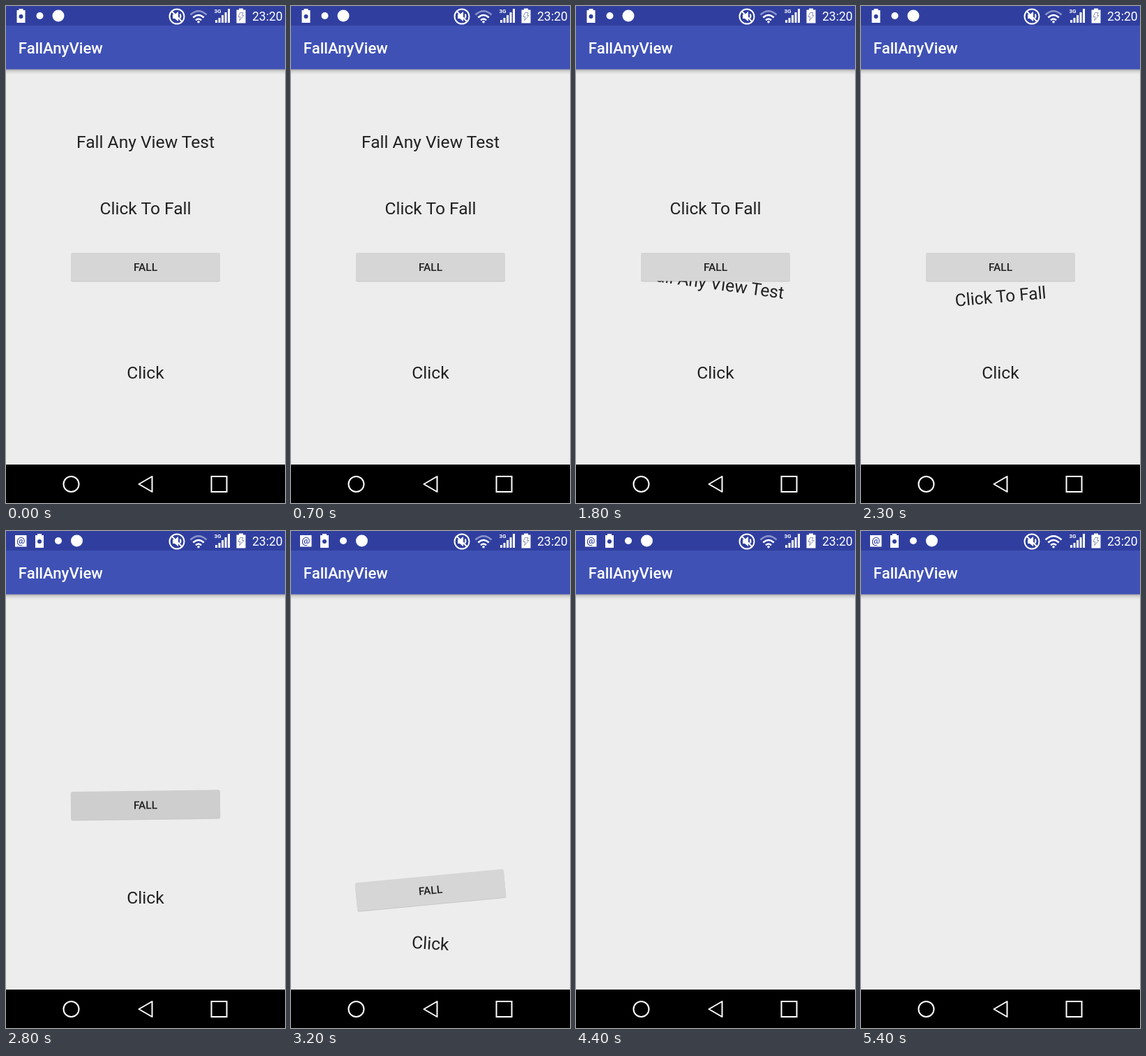
These frames come from a looping animation (400 by 711 pixels, 5500 ms). An HTML page:

```html
<!DOCTYPE html>
<html lang="en">
<head>
<meta charset="utf-8">
<title>FallAnyView</title>
<style>
html, body { margin: 0; width: 100%; height: 100%; overflow: hidden; background: #ededed; }
svg { display: block; width: 400px; height: 711px; }
text { font-family: Roboto, sans-serif; }
.view { font-size: 24.6px; fill: #212121; text-anchor: middle; }
.medium { font-weight: 500; }
.line { fill: none; stroke: #fff; stroke-width: 2; }
</style>
</head>
<body>
<svg viewBox="0 0 400 711">
  <defs>
    <linearGradient id="shade" x1="0" y1="0" x2="0" y2="1">
      <stop offset="0" stop-color="#000" stop-opacity=".32"/>
      <stop offset=".45" stop-color="#000" stop-opacity=".1"/>
      <stop offset="1" stop-color="#000" stop-opacity="0"/>
    </linearGradient>
    <clipPath id="content"><rect y="90" width="400" height="566"/></clipPath>
  </defs>

  <rect width="400" height="711" fill="#ededed"/>
  <g clip-path="url(#content)">
    <g id="title"><text class="view" x="200" y="203">Fall Any View Test</text></g>
    <g id="hint"><text class="view" x="200" y="298">Click To Fall</text></g>
    <g id="button">
      <rect x="93" y="354.5" width="214" height="40" rx="2.5" fill="#000" opacity=".16"/>
      <rect id="face" x="93" y="353" width="214" height="40.5" rx="2.5" fill="#d6d6d6"/>
      <text class="medium" x="200" y="379" font-size="15.5" fill="#212121" text-anchor="middle">FALL</text>
    </g>
    <g id="click"><text class="view" x="200" y="533">Click</text></g>
  </g>

  <rect y="90" width="400" height="8" fill="url(#shade)"/>
  <rect y="27" width="400" height="63.5" fill="#3f51b5"/>
  <rect width="400" height="28" fill="#303f9f"/>
  <text class="medium" x="17.8" y="67.5" font-size="22.2" fill="#fff">FallAnyView</text>

  <g id="mail">
    <rect x="13" y="6" width="16.5" height="16.5" fill="#fff"/>
    <text class="medium" x="21.2" y="18" font-size="13.5" fill="#303f9f" text-anchor="middle">@</text>
  </g>
  <g id="notices" fill="#fff">
    <path d="M18.500 4h6v2h3v18h-12v-18h3z"/>
    <circle cx="21.500" cy="15" r="3" fill="#303f9f"/>
    <circle cx="48.500" cy="14" r="5"/>
    <circle cx="75" cy="14" r="8.500"/>
  </g>

  <circle class="line" cx="245" cy="15" r="10.500"/>
  <path d="M239 12h3l5-4v14l-5-4h-3z" fill="#fff"/>
  <path class="line" d="M238 8l14 14M249.500 11.500q2 3 0 6"/>
  <g class="line" style="stroke-width:2.600">
    <path id="outer" d="M264.500 12.500q11.500-10.500 23 0"/>
    <path d="M268.300 16.500q7.700-7 15.400 0"/>
    <path d="M272 20.200q4-3.400 8 0"/>
  </g>
  <circle cx="276" cy="22.800" r="1.800" fill="#fff"/>
  <text x="298.500" y="10" font-size="8" font-weight="700" fill="#fff">3G</text>
  <path d="M300 20h3v4h-3zM304.500 17h3v7h-3zM309 13h3v11h-3zM313.500 9h3v15h-3zM318 4h3v20h-3z" fill="#fff"/>
  <path d="M334 3.500h6v2h3.500v19h-13v-19h3.500z" fill="#fff"/>
  <path d="M335.500 9.500h4.500l-1.500 4h2.500l-6.500 7.500 1.500-5.500h-3z" fill="none" stroke="#8f96bd"/>
  <text x="353" y="21" font-size="17.500" fill="#fff">23:20</text>

  <rect y="656" width="400" height="55"/>
  <circle class="line" cx="93.500" cy="684" r="11"/>
  <path class="line" d="M209.500 673v22l-19-11z" stroke-linejoin="round"/>
  <rect class="line" x="294.500" y="673" width="22" height="22"/>
</svg>
<script>
const LOOP = 5500, STEP = 100, LIFE = 850;
const el = id => document.getElementById(id);

// drop (px) and turn (deg) are the values reached one second into a fall
const falls = [
  { node: el('title'), cy: 194, start: 1180, drop: 527, turn: 20 },
  { node: el('hint'), cy: 289, start: 1780, drop: 466, turn: -18.5 },
  { node: el('button'), cy: 373.5, start: 2571, drop: 355, turn: -13.6 },
  { node: el('click'), cy: 524, start: 2830, drop: 478, turn: 25 }
];
const face = el('face'), mail = el('mail'), notices = el('notices'), outer = el('outer');

function pose(f, t) {
  const age = Math.max(0, t - f.start);
  const p = (age / 1000) ** 2;
  f.node.setAttribute('transform', `translate(0 ${f.drop * p}) rotate(${f.turn * p} 200 ${f.cy})`);
  f.node.setAttribute('opacity', Math.max(0, Math.min(1, (LIFE - age) / 100)));
}

function draw(t) {
  falls.forEach(f => pose(f, t));
  face.setAttribute('fill', t >= 2600 && t < 3000 ? '#cecece' : '#d6d6d6');
  const mailed = t >= 2600;
  mail.setAttribute('opacity', mailed ? 1 : 0);
  notices.setAttribute('transform', `translate(${mailed ? 26.5 : 0} 0)`);
  const strong = (t >= 1200 && t < 1800) || t >= 5400;
  outer.setAttribute('opacity', strong ? 1 : 0.45);
}

const origin = performance.now();
function tick() {
  const t = (performance.now() - origin) % LOOP;
  draw(Math.floor(t / STEP) * STEP);
  requestAnimationFrame(tick);
}
tick();
</script>
</body>
</html>
```
